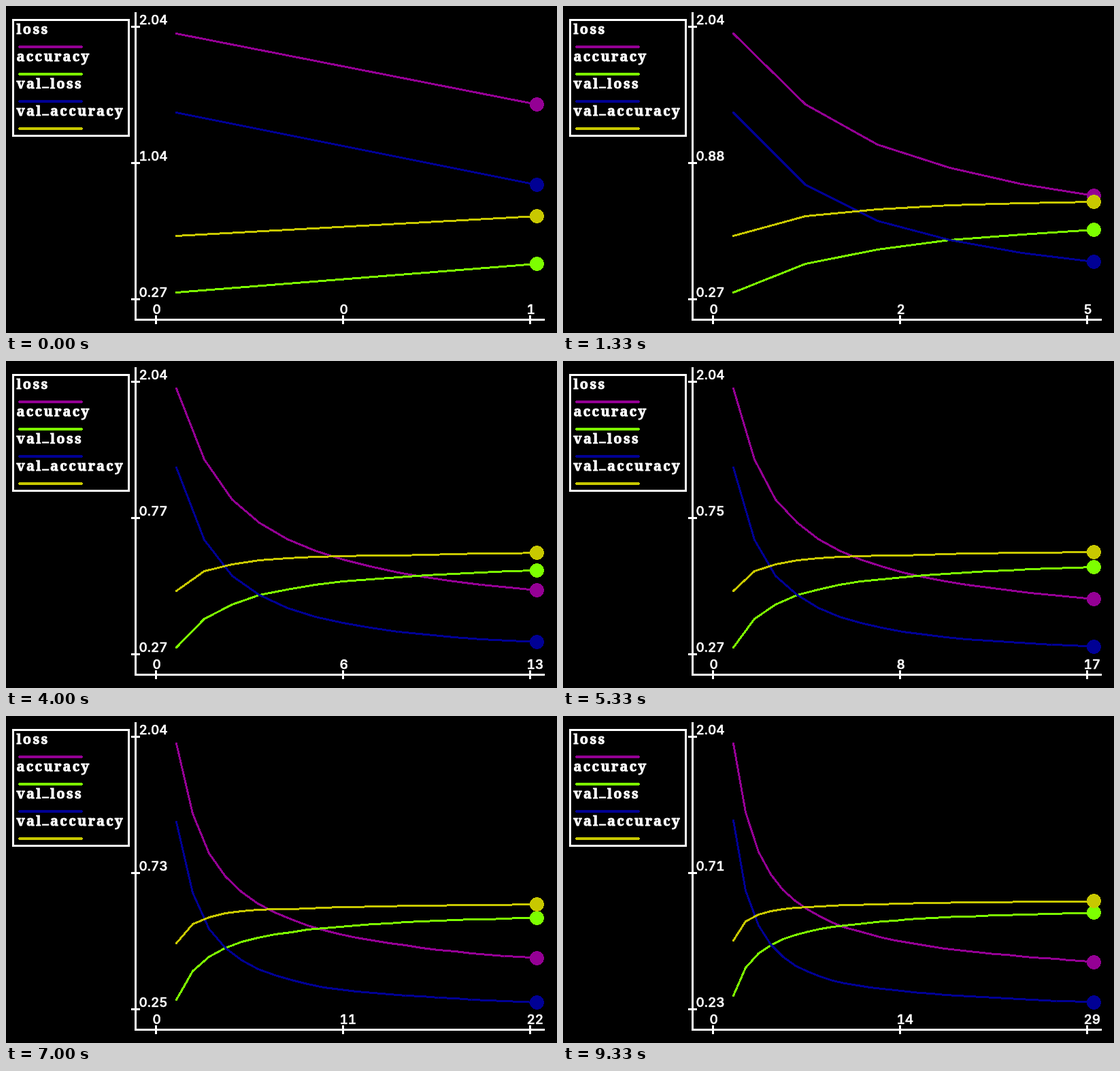
These frames come from a looping animation (810x480 px, 9670 ms). An HTML page:

```html
<!DOCTYPE html>
<html lang="en">
<head>
<meta charset="utf-8">
<title>Training curves</title>
<style>
html, body { margin: 0; width: 100%; height: 100%; overflow: hidden; background: #000; }
svg { display: block; width: 810px; height: 480px; }
path, polyline { fill: none; stroke-linecap: round; stroke-linejoin: round; }
path, polyline, circle { shape-rendering: crispEdges; }
text { stroke: #fff; }
.num { font: 500 19px Inter, "Open Sans", sans-serif; font-variant-numeric: tabular-nums; stroke-width: .6px; }
.key { font: 700 20px "Noto Serif", serif; letter-spacing: 2.3px; stroke-width: .9px; }
</style>
</head>
<body>
<svg viewBox="0 0 810 480" fill="#fff">
  <rect width="810" height="480" fill="#000"/>
  <g id="stage" transform="translate(.5 .5)">
    <path d="M10 20H180V190H10ZM190 10V460H790M220 455V465M495 455V465M770 455V465M185 30H195M185 230H195M185 430H195"
      stroke="#fff" stroke-width="3"/>
  </g>
</svg>
<script>
const LOOP = 9670, STEPS = 29;
const TOP = 40, BOTTOM = 420, HIGH = 2.036, LOW = 0.272;

// Each curve is a smooth spline over log2(epoch + 1) through a few heights.
const knots = [0, 1, 2, 4, 8, 15, 29].map(e => Math.log2(e + 1));
const series = [
  { name: "loss", color: "#940094", keys: [40, 144, 203, 260.5, 309.5, 343, 369] },
  { name: "accuracy", color: "#7dff00", keys: [420, 377.5, 356.5, 334.5, 316.5, 304, 295] },
  { name: "val_loss", color: "#000094", keys: [156, 261.5, 314.5, 361.5, 397, 415.5, 430] },
  { name: "val_accuracy", color: "#c8c800", keys: [336.5, 307.5, 297.5, 289, 284.5, 280.5, 277.5] }
];

const stage = document.getElementById("stage");

function add(tag, attrs, text = "", parent = stage) {
  const el = document.createElementNS("http://www.w3.org/2000/svg", tag);
  for (const key in attrs) el.setAttribute(key, attrs[key]);
  el.textContent = text;
  return parent.appendChild(el);
}

const gap = j => knots[j + 1] - knots[j];
const slope = (keys, j) => (keys[j + 1] - keys[j]) / gap(j);

function tangent(keys, j) {
  if (j === 0) return slope(keys, 0);
  if (j === knots.length - 1) return slope(keys, j - 1);
  return (slope(keys, j - 1) * gap(j) + slope(keys, j) * gap(j - 1)) / (gap(j - 1) + gap(j));
}

function height(keys, epoch) {
  const x = Math.log2(epoch + 1);
  const j = Math.max(0, knots.findIndex(k => k >= x) - 1);
  const t = (x - knots[j]) / gap(j), u = 1 - t;
  return u * u * ((1 + 2 * t) * keys[j] + t * gap(j) * tangent(keys, j))
    + t * t * ((1 + 2 * u) * keys[j + 1] - u * gap(j) * tangent(keys, j + 1));
}

const value = h => HIGH - (h - TOP) * (HIGH - LOW) / (BOTTOM - TOP);
const label = (x, y) => add("text", { class: "num", x, y });

series.forEach((s, i) => {
  s.data = Array.from({ length: STEPS + 1 }, (_, e) => height(s.keys, e));
  const y = 40 + i * 40;
  const key = add("text", { class: "key", x: 15, y });
  s.name.split(/(_)/).forEach((part, n) => add("tspan", { dy: [0, -4, 4][n] }, part, key));
  add("path", { d: `M20 ${y + 19.7}H110`, stroke: s.color, "stroke-width": 4.5 });
});

const yLabels = [26, 226, 426].map(y => label(195, y));
const xLabels = [215, 490, 765].map(x => label(x, 451));

for (const s of series) {
  s.line = add("polyline", { stroke: s.color, "stroke-width": 3 });
  s.dot = add("circle", { cx: 780, r: 10.5, fill: s.color });
}

function draw(epochs) {
  const shown = series.map(s => s.data.slice(0, epochs + 1));
  const all = shown.flat();
  const lowest = Math.max(...all);
  const mean = all.reduce((a, b) => a + b) / all.length;
  const scale = (BOTTOM - TOP) / (lowest - TOP);

  series.forEach((s, i) => {
    const ys = shown[i].map(h => Math.round(TOP + (h - TOP) * scale));
    s.line.setAttribute("points", ys.map((y, e) => `${Math.round(250 + 530 * e / epochs)},${y}`).join(" "));
    s.dot.setAttribute("cy", ys[epochs]);
  });
  [TOP, mean, lowest].forEach((h, i) => { yLabels[i].textContent = value(h).toFixed(2); });
  [0, Math.floor(epochs / 2), epochs].forEach((n, i) => { xLabels[i].textContent = n; });
}

// Steps begin at thirds of a second, rounded to 10 ms.
const begin = k => Math.round(k * 100 / 3) * 10;
let last = -1;

function tick() {
  const t = performance.now() % LOOP;
  let k = Math.min(STEPS - 1, Math.floor((t + 5) * 3 / 1000));
  if (t < begin(k)) k--;
  if (k !== last) draw((last = k) + 1);
  requestAnimationFrame(tick);
}
tick();
</script>
</body>
</html>
```
